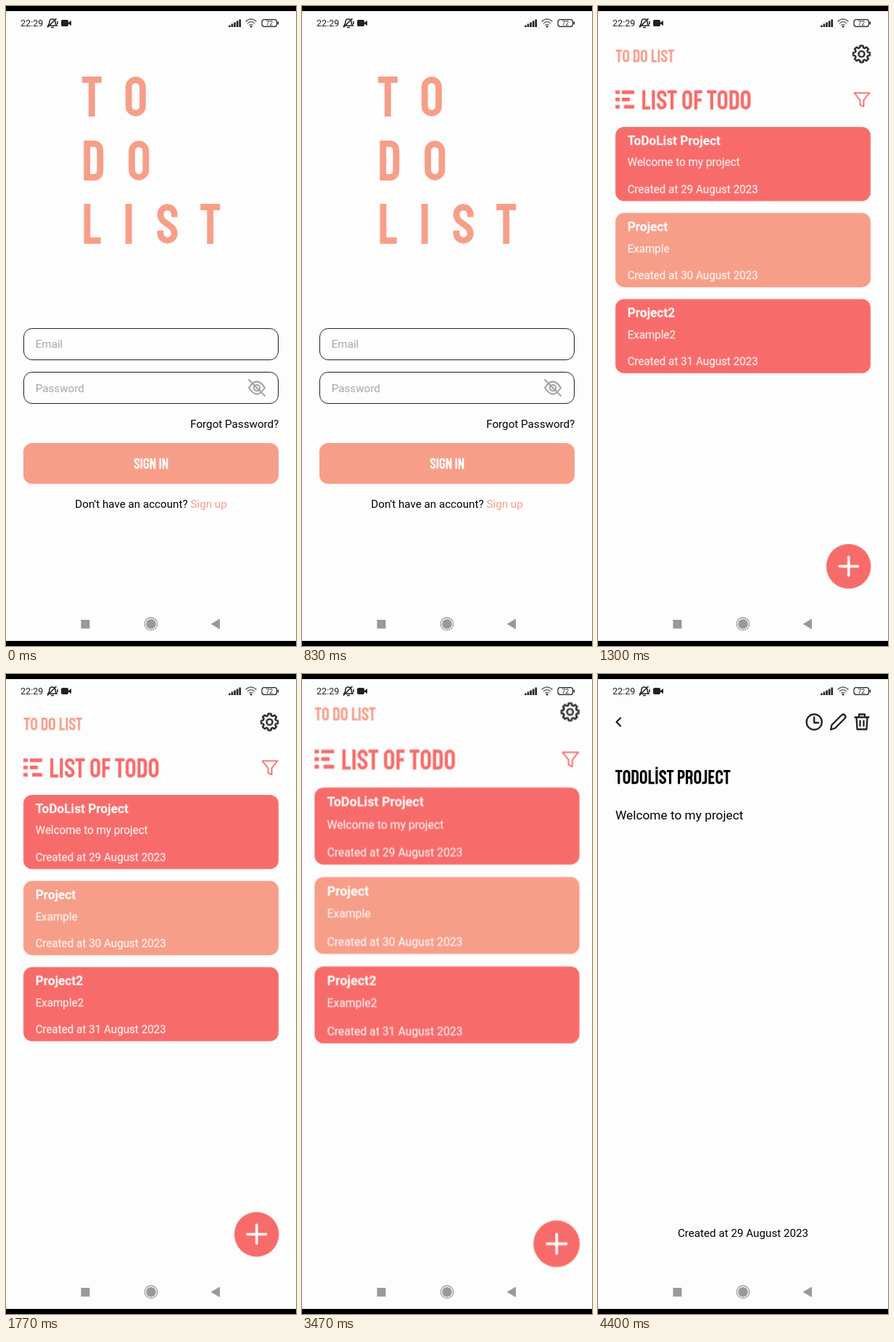
An HTML page that plays this animation: 400 px wide and 880 px high, repeating every 4430 ms.

```html
<!DOCTYPE html>
<html lang="en">
<head>
<meta charset="utf-8">
<title>To do list</title>
<style>
  :root { --red: #f76c6a; --peach: #f79e89; --paper: #fdfdfd; --ink: #222; --grey: #999; --hint: #a8a8a8; }
  html, body { margin: 0; width: 100%; height: 100%; overflow: hidden; background: #000; }
  svg { display: block; width: 400px; height: 880px; }
  text { font: 15.2px Roboto, sans-serif; }
  .page { transform-origin: 200px 430px; }
  .paper { fill: var(--paper); }
  .line { fill: none; stroke: var(--ink); stroke-width: 2.3; stroke-linecap: round; stroke-linejoin: round; }
  .cap path { fill: none; stroke-width: 16; }
  .peach { stroke: var(--peach); }
  .red { stroke: var(--red); }
  .hint { fill: var(--hint); }
  .grey { fill: var(--grey); }
  .ink { fill: var(--ink); }
  .bold { font-size: 17.3px; font-weight: 700; }
</style>
</head>
<body>
<svg viewBox="0 0 400 880">
  <clipPath id="window"><rect y="33" width="400" height="794"/></clipPath>
  <rect class="paper" y="7" width="400" height="866"/>

  <g clip-path="url(#window)">
    <g class="page" id="signin">
      <rect class="paper" y="33" width="400" height="794"/>
      <g class="peach">
        <g class="cap" data-text="TO" data-gap="54" transform="translate(104.3 97) scale(.55)"/>
        <g class="cap" data-text="DO" data-gap="54" transform="translate(104.3 185) scale(.55)"/>
        <g class="cap" data-text="LIST" data-gap="54" transform="translate(104.3 272) scale(.55)"/>
      </g>
      <g fill="none" stroke="#222">
        <rect x="24.5" y="443.5" width="351" height="43" rx="11.5"/>
        <rect x="24.5" y="503.5" width="351" height="43" rx="11.5"/>
      </g>
      <text class="hint" x="40.7" y="470.4">Email</text>
      <text class="hint" x="40.7" y="530.8">Password</text>
      <g class="line" style="stroke:var(--hint)">
        <path d="M335 525Q346 508 357 525Q346 542 335 525ZM335 514L357 536"/>
        <circle cx="346" cy="525" r="4.2"/>
      </g>
      <text x="376.3" y="580" text-anchor="end">Forgot Password?</text>
      <rect x="24" y="601" width="352" height="56" rx="12" fill="var(--peach)"/>
      <g class="cap" data-text="SIGN IN" stroke="#fff" transform="translate(176.4 621.7) scale(.147)"/>
      <text x="200" y="690" text-anchor="middle">Don't have an account? <tspan fill="var(--peach)">Sign up</tspan></text>
    </g>

    <g class="page" id="list">
      <rect class="paper" y="33" width="400" height="794"/>
      <g class="cap peach" data-text="TO DO LIST" transform="translate(24.4 60) scale(.174)"/>
      <path class="line" id="gear"/>
      <circle class="line" cx="363.5" cy="66" r="4"/>
      <path fill="var(--red)" d="M24 116h6v5h-6zM33 116h17v5h-17zM24 126h6v5h-6zM33 126h11v5h-11zM24 136h6v5h-6zM36 136h14v5h-14z"/>
      <g class="cap red" data-text="LIST OF TODO" transform="translate(59.4 115.8) scale(.266)"/>
      <path class="line" style="stroke:var(--red);stroke-width:1.8" d="M353.5 119.5H374.5L366.5 129.5V138.5L361.5 136V129.5Z"/>
      <g id="cards"></g>
      <g id="add">
        <circle cx="345.6" cy="770.4" r="30.8" fill="var(--red)"/>
        <path d="M333 770.4h25.5M345.7 757.6v25.5" stroke="#fff" stroke-width="3.6" stroke-linecap="round"/>
      </g>
    </g>

    <g class="page" id="detail">
      <rect class="paper" y="33" width="400" height="794"/>
      <g class="line">
        <path d="M31 60.5L25.5 66L31 71.5"/>
        <circle cx="298.2" cy="66" r="10.6"/>
        <path d="M298.2 59.5V67H304"/>
        <path d="M321 76.5L322.5 70L336 56.5Q338.5 54.5 340.5 56.5Q342.5 59 340.5 61L327 74.5Z"/>
        <path d="M354.5 59.5H373.5M360 59.5V55.5H368V59.5M356.5 59.5L357.5 76H370.5L371.5 59.5M361.5 64.5V71.5M366.5 64.5V71.5"/>
      </g>
      <g class="cap" data-text="TODOLİST PROJECT" stroke="#000" transform="translate(23.8 132) scale(.193)"/>
      <text x="24" y="200" style="font-size:17.3px">Welcome to my project</text>
      <text x="200" y="774" text-anchor="middle">Created at 29 August 2023</text>
    </g>
  </g>

  <g class="ink">
    <text x="20" y="28" style="font-size:12.6px">22:29</text>
    <path d="M58 27Q60 25 60 22Q60 18 64 18Q68 18 68 22Q68 25 70 27Z" fill="none" stroke="#222" stroke-width="1.6"/>
    <path d="M57 29.5L69.5 17M62 29.5h4M71 21v4" stroke="#222" stroke-width="1.6"/>
    <rect x="76" y="19" width="10" height="9" rx="2"/>
    <path d="M86 23L90 20V27L86 24.5Z"/>
    <g id="signal"></g>
    <g fill="none" stroke="#666" stroke-width="1.5">
      <path d="M330.5 21.5Q338 14.5 345.5 21.5M333 24Q338 19 343 24M335.5 26.5Q338 24 340.5 26.5"/>
      <rect x="353" y="18.7" width="20.5" height="9.6" rx="3" stroke="#222" stroke-width="1.2"/>
    </g>
    <circle cx="338" cy="28.3" r="1.3"/>
    <rect x="374.5" y="21.5" width="1.6" height="4" rx=".8"/>
    <text x="363.2" y="26.5" text-anchor="middle" style="font-size:8.5px">72</text>
  </g>

  <g class="grey">
    <rect x="103.5" y="844" width="12" height="12"/>
    <circle cx="200" cy="849.7" r="6.8"/>
    <circle cx="200" cy="849.7" r="8.7" fill="none" stroke="#999" stroke-width="1.3"/>
    <path d="M282.5 849.7L295 842.5V857Z"/>
  </g>
</svg>

<script>
const $ = id => document.getElementById(id);

// Condensed capitals as strokes on a 100 unit cap height: [bearing, advance, path]
const over = 'a17.5 17.5 0 0 0-35 0';
const under = 'a17.5 17.5 0 0 0 35 0';
const bowl = 'M8 100V8H24Q41 8 41 24V38Q41 54 24 54H8';
const glyphs = {
  T: [1, 51, 'M0 8H49M24.5 0V100'],
  O: [5, 61, `M43 26${over}V74${under}Z`],
  D: [5.5, 59, 'M8 8H24Q41 8 41 26V74Q41 92 24 92H8Z'],
  L: [6, 50, 'M8 0V92H42'],
  I: [6, 28, 'M8 0V100'],
  İ: [6, 28, 'M8 0V100M8-22V-7'],
  S: [3.6, 57, `M43 33V26${over}C8 52 43 50 43 74a17.5 17.5 0 0 1-35 0V67`],
  F: [6, 48, 'M41 8H8V100M8 51H37'],
  G: [5, 60, `M43 34V26${over}V74${under}V56H27`],
  N: [6, 65, 'M8 100V0M45 100V0M10 5L43 95'],
  P: [6, 57, bowl],
  R: [6, 60, bowl + 'M24 54Q40 54 40 70V86Q40 95 43 100'],
  J: [1, 42, 'M27 0V76Q27 92 12 92H0'],
  E: [6, 52, 'M41 8H8V92H41M8 50H36'],
  C: [5, 59, `M43 37V26${over}V74${under}V63`],
  ' ': [0, 23, '']
};

for (const word of document.querySelectorAll('.cap')) {
  const { text, gap = 0 } = word.dataset;
  let x = 0;
  word.setAttribute('role', 'img');
  word.setAttribute('aria-label', text);
  word.innerHTML = [...text].map(ch => {
    const [bearing, advance, d] = glyphs[ch];
    const left = x + bearing;
    x += advance + Number(gap);
    return `<path d="${d}" transform="translate(${left})"/>`;
  }).join('');
}

const cards = [
  ['ToDoList Project', 'Welcome to my project', 29, 'red'],
  ['Project', 'Example', 30, 'peach'],
  ['Project2', 'Example2', 31, 'red']
];
$('cards').innerHTML = cards.map(([title, note, day, color], i) => `
  <g fill="#fff" transform="translate(0 ${166.2 + i * 118.4})">
    <rect x="24" width="352" height="102" rx="12" fill="var(--${color})"/>
    <text class="bold" x="40.6" y="25">${title}</text>
    <text x="40.6" y="54.2">${note}</text>
    <text x="40.6" y="91.3">Created at ${day} August 2023</text>
  </g>`).join('');

$('signal').innerHTML = [0, 1, 2, 3, 4].map(i =>
  `<rect x="${307 + i * 3.6}" y="${26.5 - i * 2}" width="2.6" height="${2.5 + i * 2}"/>`).join('');

const gearPoints = [];
for (let tooth = 0; tooth < 8; tooth++) {
  for (const [turn, r] of [[-.27, 9], [-.17, 11.6], [.17, 11.6], [.27, 9]]) {
    const a = tooth * Math.PI / 4 + turn;
    gearPoints.push(`${363.5 + r * Math.cos(a)} ${66 + r * Math.sin(a)}`);
  }
}
$('gear').setAttribute('d', `M${gearPoints.join('L')}Z`);

// Page changes: zoom with a fast start and a long settle, cross-fade near its end
const loop = 4430, zoomTime = 300, fadeFrom = 145, fadeTo = 245;
const openList = 835, openDetail = 3427;

function play(el, frames) {
  el.animate(frames, { duration: loop, iterations: Infinity });
}

function zoom(start, from, to) {
  const at = (part, grow, easing) => ({
    offset: (start + part * zoomTime) / loop,
    transform: `scale(${from + (to - from) * grow})`,
    easing
  });
  return [
    at(0, 0, 'cubic-bezier(.3,0,.8,.15)'),
    at(1 / 6, .4, 'cubic-bezier(.05,.7,.1,1)'),
    at(1, 1, 'linear')
  ];
}

function move(el, ...zooms) {
  const steps = zooms.flat();
  play(el, [
    { offset: 0, transform: steps[0].transform },
    ...steps,
    { offset: 1, transform: steps.at(-1).transform }
  ]);
}

function fadeIn(el, start) {
  play(el, [
    { offset: 0, opacity: 0 },
    { offset: (start + fadeFrom) / loop, opacity: 0 },
    { offset: (start + fadeTo) / loop, opacity: 1 },
    { offset: 1, opacity: 1 }
  ]);
}

move($('signin'), zoom(openList, 1, 1.15));
move($('list'), zoom(openList, .85, 1), zoom(openDetail, 1, 1.15));
move($('detail'), zoom(openDetail, .85, 1));
fadeIn($('list'), openList);
fadeIn($('add'), openList);
fadeIn($('detail'), openDetail);
</script>
</body>
</html>
```
